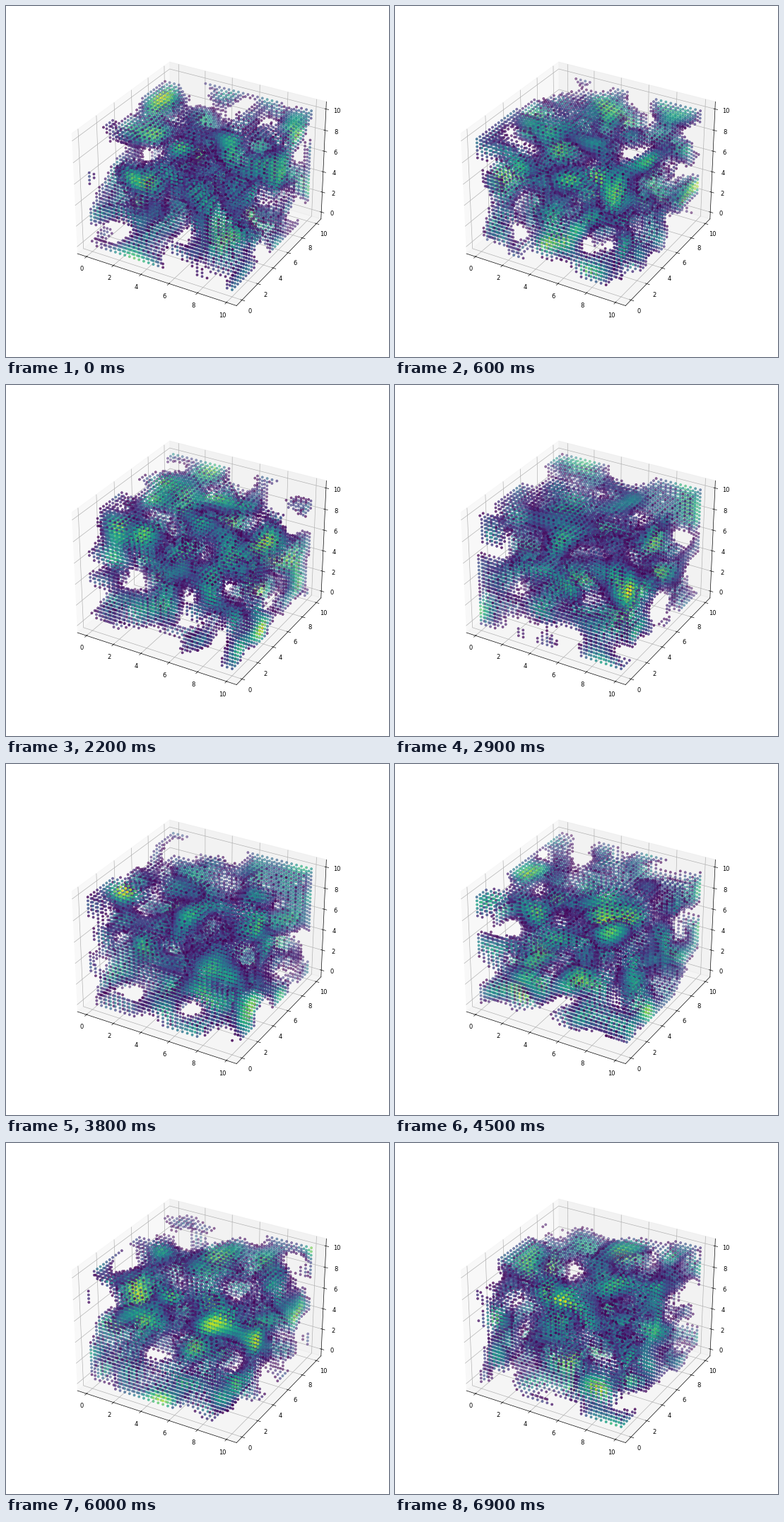
A matplotlib script for the animation above (7.1 s loop, 542x496 px).

```python
from itertools import product

import matplotlib.pyplot as plt
import numpy as np
from matplotlib.animation import FuncAnimation

WIDTH, HEIGHT, DPI = 542, 496, 60
LOOP_MS, STEP_MS = 7100, 100
GRID = 30          # points along each edge of the cube
CELL = 2.2         # size of one noise cell in axis units
SEED = 40

# Time in ms at which each new random cloud replaces the last one.
STARTS = [0, 500, 1100, 1700, 2200, 2800, 3300,
          3800, 4300, 4900, 5400, 5900, 6400, 6900]

axis = np.linspace(0, 10, GRID)
points = np.stack(np.meshgrid(axis, axis, axis, indexing="ij"), -1).reshape(-1, 3)


def perlin(rng):
    """Gradient noise at every grid point, with a random lattice shift."""
    nodes = int(10 / CELL) + 3
    gradients = rng.standard_normal((nodes, nodes, nodes, 3))
    gradients /= np.linalg.norm(gradients, axis=-1, keepdims=True)
    place = points / CELL + rng.random(3)
    cell = place.astype(int)
    local = place - cell
    fade = local**3 * (local * (6 * local - 15) + 10)
    total = np.zeros(len(points))
    for corner in product((0, 1), repeat=3):
        weight = np.where(corner, fade, 1 - fade).prod(axis=1)
        slope = gradients[tuple((cell + corner).T)]
        total += weight * (slope * (local - corner)).sum(axis=1)
    return total


fig = plt.figure(figsize=(WIDTH / DPI, HEIGHT / DPI), dpi=DPI)
side = 400.8
ax = fig.add_axes([70.8 / WIDTH, 47.2 / HEIGHT, side / WIDTH, side / HEIGHT],
                  projection="3d")
limits, ticks = (-0.68, 10.68), range(0, 11, 2)
ax.set(xlim=limits, ylim=limits, zlim=limits,
       xticks=ticks, yticks=ticks, zticks=ticks)


def render(index):
    noise = perlin(np.random.default_rng(SEED + index))
    shown = noise > 0
    cloud = ax.scatter(*points[shown].T, c=noise[shown], s=13, cmap="viridis")
    fig.canvas.draw()
    cloud.remove()
    return np.array(fig.canvas.buffer_rgba())


# Each cloud is drawn once and reused while it stays on screen.
pictures = [render(index) for index in range(len(STARTS))]
ax.remove()
stage = fig.figimage(pictures[0])


def update(frame):
    index = np.searchsorted(STARTS, frame * STEP_MS, side="right") - 1
    stage.set_data(pictures[index])
    return [stage]


anim = FuncAnimation(fig, update, frames=LOOP_MS // STEP_MS,
                     interval=STEP_MS, repeat=True, repeat_delay=0)
plt.show()
```
